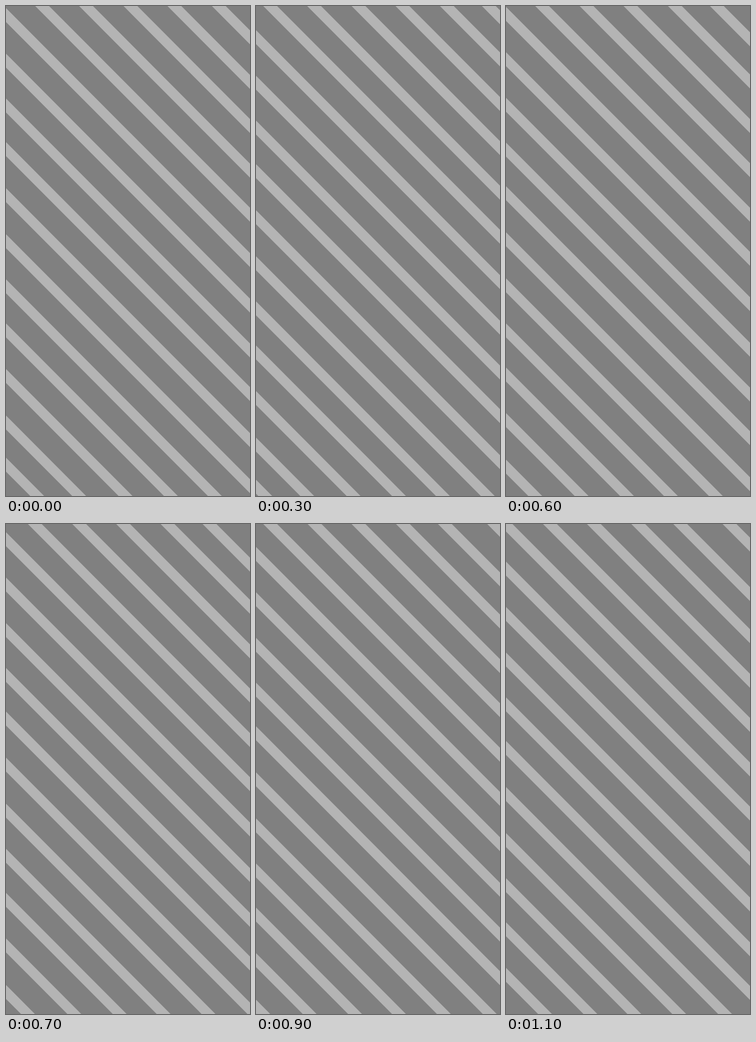
These frames come from a looping animation (500 px wide and 1000 px high, 1.2 s). An HTML page:

```html
<!DOCTYPE html>
<html lang="en">
<head>
<meta charset="utf-8">
<title>Diagonal stripes</title>
<style>
  html, body { margin: 0; height: 100%; overflow: hidden; background: #808080; }
  svg { display: block; width: 100%; height: 100%; }
</style>
</head>
<body>
<svg viewBox="0 0 500 1000">
  <path id="stripes" fill="none" stroke="#b4b4b4" stroke-width="20"/>
</svg>
<script>
const LOOP = 1200, STEP = 100, SHIFT = 15;

// Height at which the middle of each 45-degree stripe crosses the left edge
const offsets = [-623, -522, -436, -345, -255, -164, -74, 18.5, 111.5, 203,
                 292, 386, 480, 572, 662, 755, 850, 936];

const stripes = document.getElementById('stripes');
stripes.setAttribute('d', offsets.map(y => `M-40 ${y - 40}l580 580`).join(''));

function draw() {
  const step = Math.floor(performance.now() % LOOP / STEP);
  stripes.setAttribute('transform', `translate(0 ${step * SHIFT})`);
  requestAnimationFrame(draw);
}
draw();
</script>
</body>
</html>
```
